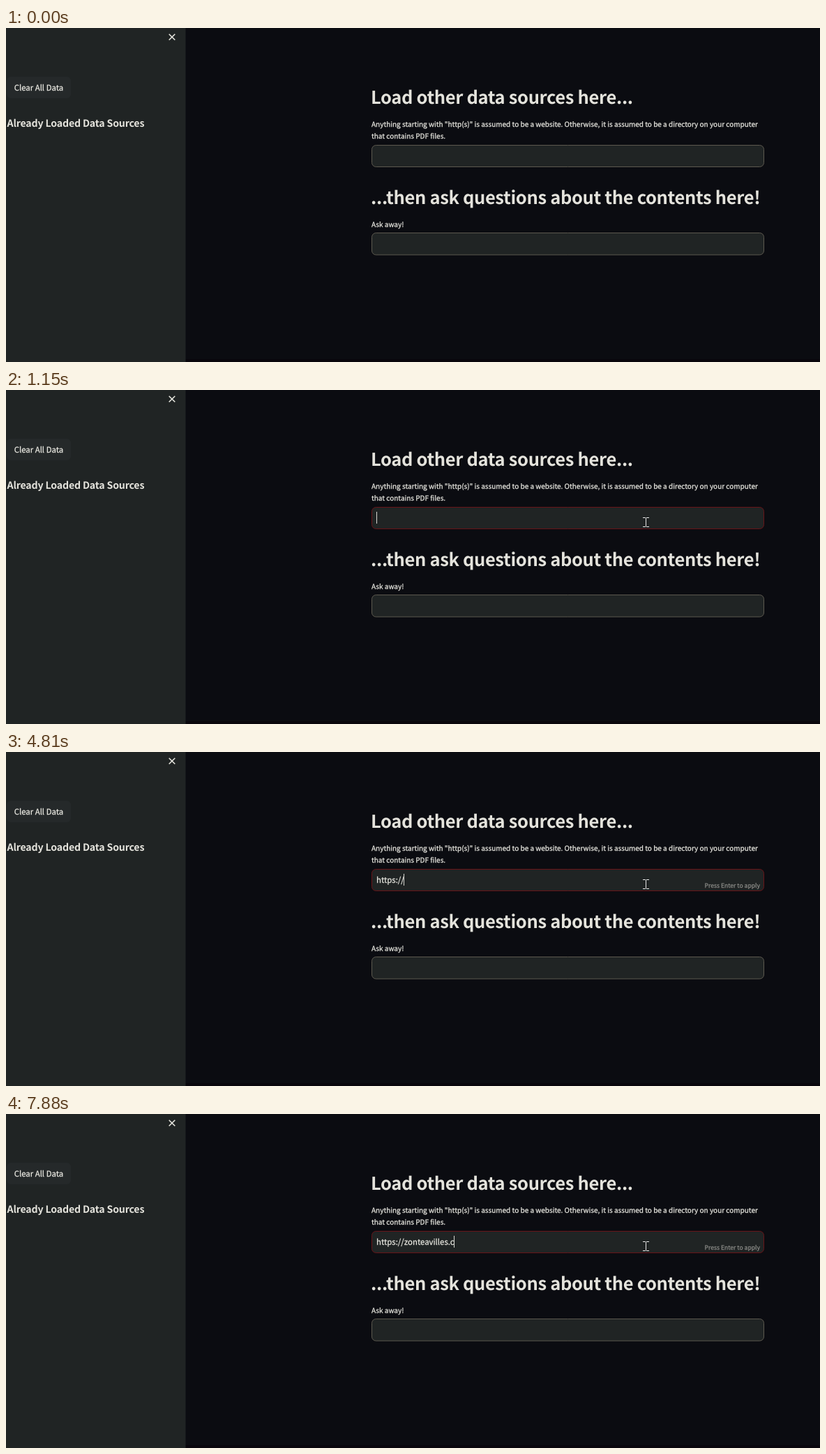
Recreate the animation shown at these times as an HTML page with a canvas. Size 1167x480 px, loop 8 s.

```html
<!DOCTYPE html>
<html lang="en">
<head>
<meta charset="utf-8">
<title>Load and ask</title>
<style>
  html, body { margin: 0; width: 100%; height: 100%; overflow: hidden; background: #0b0c11; }
  canvas { display: block; width: 1167px; height: 480px; }
</style>
</head>
<body>
<canvas id="stage" width="1167" height="480"></canvas>
<script>
const ctx = document.getElementById('stage').getContext('2d');
const LOOP = 8000;
const FAMILY = '"Noto Sans CJK JP", "Noto Sans CJK SC", "Noto Sans CJK", "Noto Sans", sans-serif';
const SIZE = { title: 25.5, subtitle: 14.2, input: 11.4, label: 10, hint: 8.6 };
const COLOR = {
  page: '#0b0c11', panel: '#202424', button: '#25292a', text: '#eae9e2',
  heading: '#e4e3dc', border: '#5d594f', hint: '#8b8c88', link: '#3d9df3'
};

const TYPED = 'https://zonteavilles.c';
const KEY_TIMES = [1830, 2080, 2210, 2540, 3000, 4010, 4480, 4810, 5140, 5410, 5480,
  5680, 5940, 6070, 6270, 6470, 6670, 6800, 6930, 7130, 7600, 7880];
const FOCUS = 950;
const CARET_OFF = [[1560, 1830], [3550, 4010]];

// time, x, y of the pointer
const POINTER = [[120, 1069, 437], [190, 1049, 418], [260, 1020, 385], [330, 1000, 350],
  [400, 985, 322], [470, 965, 295], [540, 945, 270], [610, 930, 243], [670, 920, 215],
  [740, 917, 198], [810, 917, 193], [880, 917, 190]];

const LINK = new Path2D('M10 13a5 5 0 0 0 7.54.54l3-3a5 5 0 0 0-7.07-7.07l-1.72 1.71' +
  'M14 11a5 5 0 0 0-7.54-.54l-3 3a5 5 0 0 0 7.07 7.07l1.71-1.71');
const ARROW = new Path2D('M0 0V15.5L3.6 12.2L6 17.6L8.2 16.6L5.9 11.4H10.8Z');

const clamp = v => Math.max(0, Math.min(1, v));

function text(str, x, y, size, { color = COLOR.text, bold = false, align = 'left' } = {}) {
  ctx.font = `${bold ? 700 : 400} ${size}px ${FAMILY}`;
  ctx.letterSpacing = bold ? `${-0.0135 * size}px` : '0px';
  ctx.textRendering = 'geometricPrecision';
  ctx.textAlign = align;
  ctx.fillStyle = ctx.strokeStyle = color;
  ctx.fillText(str, x, y);
  if (!bold) {
    // a hairline outline gives small text a slightly fuller weight
    ctx.lineWidth = 0.25;
    ctx.strokeText(str, x, y);
  }
  return ctx.measureText(str).width;
}

function box(x, y, w, h, fill, stroke) {
  ctx.beginPath();
  ctx.roundRect(x, y, w, h, 6);
  ctx.fillStyle = fill;
  ctx.fill();
  if (!stroke) return;
  ctx.strokeStyle = stroke;
  ctx.lineWidth = 1;
  ctx.stroke();
}

function sidebar() {
  ctx.fillStyle = COLOR.panel;
  ctx.fillRect(0, 0, 257.5, 480);
  ctx.strokeStyle = COLOR.text;
  ctx.lineWidth = 1.5;
  ctx.beginPath();
  for (const s of [-1, 1]) {
    ctx.moveTo(238 - 4.3, 13 - 4.3 * s);
    ctx.lineTo(238 + 4.3, 13 + 4.3 * s);
  }
  ctx.stroke();
  box(1, 70, 92, 31, COLOR.button);
  text('Clear All Data', 11.7, 90, SIZE.input);
  text('Already Loaded Data Sources', 1.5, 142, SIZE.subtitle, { color: COLOR.heading, bold: true });
}

function linkBadge(t) {
  const alpha = Math.min(clamp((t - 540) / 130), clamp((1150 - t) / 200));
  if (!alpha) return;
  ctx.save();
  ctx.globalAlpha = alpha;
  ctx.fillStyle = '#10131c';
  ctx.beginPath();
  ctx.arc(502, 242.5, 16, 0, 7);
  ctx.fill();
  ctx.translate(502, 242.5);
  ctx.scale(0.62, 0.62);
  ctx.translate(-12, -12);
  ctx.strokeStyle = COLOR.link;
  ctx.lineWidth = 2;
  ctx.lineCap = ctx.lineJoin = 'round';
  ctx.stroke(LINK);
  ctx.restore();
}

function sourceField(t) {
  const mix = clamp((t - FOCUS + 70) / 200);
  const blend = (a, b) => Math.round(a + (b - a) * mix);
  const border = t < FOCUS ? COLOR.border
    : `rgb(${blend(93, 104)}, ${blend(89, 20)}, ${blend(79, 24)})`;
  box(524.5, 168.5, 562, 31, COLOR.panel, border);

  const count = KEY_TIMES.filter(k => k <= t).length;
  const width = text(TYPED.slice(0, count), 531, 188, SIZE.input);
  if (count) text('Press Enter to apply', 1081, 195, SIZE.hint, { color: COLOR.hint, align: 'right' });
  const blinkedOff = CARET_OFF.some(([from, to]) => t >= from && t < to);
  if (t >= FOCUS && !blinkedOff) {
    ctx.fillStyle = '#d8d7d1';
    ctx.fillRect(Math.floor(531 + width), 175, 1, 17);
  }
}

function pointer(t) {
  const spot = POINTER.filter(p => p[0] <= t).pop();
  if (!spot) return;
  const [, x, y] = spot;
  const overText = y < 205 || (y > 225 && y < 262) || (y > 294 && y < 327);
  ctx.save();
  ctx.translate(x, y);
  if (overText) {
    ctx.fillStyle = '#e6e6e6';
    ctx.fillRect(0, -6, 1, 12);
    for (const edge of [-7, 6]) {
      ctx.fillRect(-4, edge, 4, 1);
      ctx.fillRect(1, edge, 4, 1);
    }
  } else {
    ctx.fillStyle = '#fff';
    ctx.strokeStyle = '#000';
    ctx.lineWidth = 1;
    ctx.fill(ARROW);
    ctx.stroke(ARROW);
  }
  ctx.restore();
}

function draw(t) {
  ctx.fillStyle = COLOR.page;
  ctx.fillRect(0, 0, 1167, 480);
  ctx.fillStyle = '#09060c';
  ctx.fillRect(257, 476, 910, 4);
  sidebar();

  const title = { color: COLOR.heading, bold: true };
  text('Load other data sources here...', 523, 109, SIZE.title, title);
  text('Anything starting with "http(s)" is assumed to be a website. Otherwise, it is assumed to be a directory on your computer', 524, 142, SIZE.label);
  text('that contains PDF files.', 524, 159, SIZE.label);
  sourceField(t);

  linkBadge(t);
  text('...then ask questions about the contents here!', 523, 253, SIZE.title, title);
  text('Ask away!', 524, 286, SIZE.label);
  box(524.5, 294.5, 562, 31.5, COLOR.panel, COLOR.border);
  pointer(t);
}

function tick() {
  draw(performance.now() % LOOP);
  requestAnimationFrame(tick);
}
tick();
</script>
</body>
</html>
```
